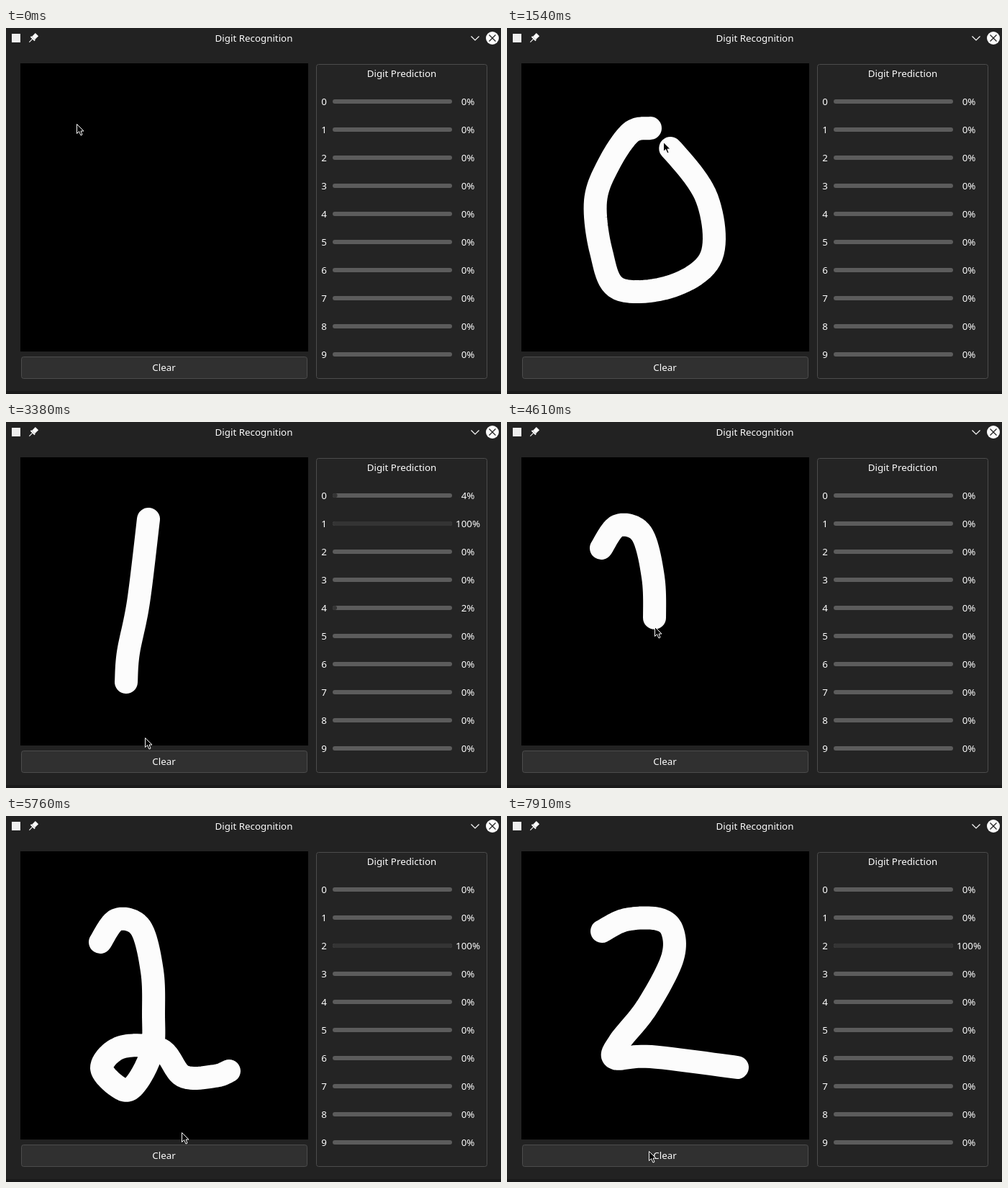
Recreate the animation shown at these times as an HTML page with a canvas. Size 688 by 508 pixels, loop 7990 ms.

```html
<!DOCTYPE html>
<html lang="en">
<head>
<meta charset="utf-8">
<title>Digit Recognition</title>
<style>
  html, body { margin: 0; width: 100%; height: 100%; overflow: hidden; background: #222; }
  canvas { display: block; }
</style>
</head>
<body>
<canvas id="stage" width="688" height="508"></canvas>
<script>
const ctx = document.getElementById('stage').getContext('2d');
const LOOP = 7990, FRAMES = 104, STEP = LOOP / FRAMES;
const PREDICT_DELAY = 165, PRESS_TIME = 110, POINTER_LEAD = 20;
const LIGHT = '#fcfcfc', DARK = '#222', BORDER = '#4c4c4c';

// start and end: pen down and up; arrive: pointer reaches the button; clear: button is released.
const drawings = [
  {
    start: 695, end: 1597, arrive: 1760, clear: 2440, button: [211, 463], percents: { 0: 100 },
    knots: [[199, 139], [172, 145], [142, 188], [123, 240], [131, 311], [155, 362],
      [230, 358], [284, 317], [278, 237], [230, 170], [194, 142]]
  },
  {
    start: 2690, end: 3120, arrive: 3510, clear: 3840, button: [202, 465], percents: { 0: 4, 1: 100, 4: 2 },
    knots: [[198, 135], [184, 250], [170, 320], [167, 361]]
  },
  {
    start: 4290, end: 5235, arrive: 6000, clear: 6200, button: [224, 465], percents: { 2: 100 },
    knots: [[131, 175], [154, 144], [187, 155], [203, 215], [205, 275], [203, 325], [183, 368],
      [163, 380], [133, 350], [160, 321], [215, 324], [246, 361], [290, 361], [310, 354]]
  },
  {
    start: 6620, end: 7390, arrive: 7680, clear: Infinity, button: [197, 465], percents: { 2: 100 },
    knots: [[132, 160], [165, 144], [210, 143], [230, 160], [229, 200], [194, 266],
      [156, 314], [150, 336], [200, 334], [320, 349]]
  }
];
for (const d of drawings) {
  d.points = smooth(d.knots);
  d.lengths = [0];
  d.points.slice(1).forEach((p, i) => {
    const q = d.points[i];
    d.lengths.push(d.lengths[i] + Math.hypot(p[0] - q[0], p[1] - q[1]));
  });
}

function within(t, from, to) { return t >= from && t < to; }
function mix(a, b, u) { return a.map((v, i) => v + (b[i] - v) * u); }

// Eased move from a to b between two times, resting outside them.
function glide(t, from, to, a, b) {
  const u = Math.max(0, Math.min(1, (t - from) / (to - from)));
  return mix(a, b, u * u * (3 - 2 * u));
}

// Catmull-Rom curve through the knots.
function smooth(knots, pieces = 12) {
  const at = i => knots[Math.max(0, Math.min(knots.length - 1, i))];
  const points = [knots[0]];
  for (let i = 0; i < knots.length - 1; i++) {
    const [a, b, c, d] = [at(i - 1), at(i), at(i + 1), at(i + 2)];
    for (let k = 1; k <= pieces; k++) {
      const u = k / pieces;
      points.push([0, 1].map(n => b[n] + u / 2 * (c[n] - a[n]
        + u * (2 * a[n] - 5 * b[n] + 4 * c[n] - d[n]
        + u * (3 * (b[n] - c[n]) + d[n] - a[n])))));
    }
  }
  return points;
}

function drawnPart({ start, end, points, lengths }, t) {
  const goal = Math.min(1, (t - start) / (end - start)) * lengths.at(-1);
  const next = Math.max(1, lengths.findIndex(l => l >= goal));
  const u = (goal - lengths[next - 1]) / (lengths[next] - lengths[next - 1]);
  return [...points.slice(0, next), mix(points[next - 1], points[next], u)];
}

function pointerAt(t) {
  const ahead = t + POINTER_LEAD;
  const next = drawings.findIndex(d => ahead < d.clear);
  const { start, end, arrive, button, knots } = drawings[next];
  if (within(ahead, start, end)) return drawnPart(drawings[next], ahead).at(-1);
  if (ahead >= end) return glide(t, end, arrive, knots.at(-1), button);
  const previous = drawings[next - 1] ?? { clear: 80, button: [98, 133] };
  return glide(t, previous.clear, start, previous.button, knots[0]);
}

function trace(points, close) {
  ctx.beginPath();
  points.forEach(p => ctx.lineTo(...p));
  if (close) ctx.closePath();
}

function line(points, color, width) {
  trace(points);
  ctx.strokeStyle = color;
  ctx.lineWidth = width;
  ctx.stroke();
}

function box(x, y, w, h, radius, fill, border) {
  ctx.beginPath();
  ctx.roundRect(x, y, w, h, radius);
  ctx.fillStyle = fill;
  ctx.fill();
  if (border) {
    ctx.strokeStyle = border;
    ctx.lineWidth = 1;
    ctx.stroke();
  }
}

function text(label, x, y) {
  ctx.fillStyle = LIGHT;
  ctx.fillText(label, x, y);
}

function drawTitleBar() {
  box(8, 8, 12, 12, 0, '#eee');
  ctx.save();
  ctx.translate(38, 14);
  ctx.rotate(Math.PI / 4);
  box(-3, -7, 6, 7, 0, LIGHT);
  box(-4, 0, 8, 2, 0, LIGHT);
  box(-0.6, 2, 1.2, 6, 0, LIGHT);
  ctx.restore();
  text('Digit Recognition', 344.5, 19);
  line([[646.5, 11.5], [652, 17], [657.5, 11.5]], LIGHT, 1.2);
  box(667, 5, 18, 18, 9, LIGHT);
  for (const side of [-4.5, 4.5]) line([[676 - side, 9.5], [676 + side, 18.5]], DARK, 1.3);
}

function drawPanel(t) {
  box(431.5, 50.5, 237, 436, 3, '#242424', BORDER);
  text('Digit Prediction', 550, 68);
  const shown = drawings.find(d => within(t, d.end + PREDICT_DELAY, d.clear));
  for (let digit = 0; digit < 10; digit++) {
    const y = 102 + 39 * digit;
    const percent = shown?.percents[digit] ?? 0;
    text(digit, 442, y + 5);
    box(454, y - 3, 166, 6, 3, '#5c5c5c');
    if (percent) box(454, y - 3, Math.max(6, 1.66 * percent), 6, 3, '#343434');
    text(percent + '%', 642, y + 5);
  }
}

function drawCanvas(t) {
  box(20, 49, 400, 400, 0, '#000');
  const current = drawings.find(d => within(t, d.start, d.clear));
  if (!current) return;
  ctx.save();
  ctx.lineCap = ctx.lineJoin = 'round';
  line(drawnPart(current, t), LIGHT, 32);
  ctx.restore();
}

function drawButton(t) {
  const shift = drawings.some(d => within(t, d.clear - PRESS_TIME, d.clear)) ? 1 : 0;
  box(21.5 + shift, 456.5 + shift, 397, 30, 3, '#303030', BORDER);
  text('Clear', 219.5 + shift, 476 + shift);
}

function drawPointer(t) {
  const [x, y] = pointerAt(t).map(Math.round);
  ctx.save();
  ctx.translate(x + 0.5, y + 0.5);
  trace([[0, 0], [0, 13], [3, 10], [5.5, 15.5], [7.5, 14.5], [5.5, 9.5], [9.5, 9.5]], true);
  ctx.fillStyle = '#000';
  ctx.fill();
  ctx.strokeStyle = LIGHT;
  ctx.lineWidth = 1;
  ctx.stroke();
  ctx.restore();
}

function render(now) {
  const t = Math.floor((now % LOOP + 5) / STEP) % FRAMES * STEP;
  ctx.font = '13.33px "Noto Sans", sans-serif';
  ctx.textAlign = 'center';
  box(0, 0, 688, 508, 0, DARK);
  box(0, 504, 688, 4, 0, '#1a1a1a');
  drawTitleBar();
  drawPanel(t);
  drawCanvas(t);
  drawButton(t);
  drawPointer(t);
}

const began = performance.now();
function tick() {
  render(performance.now() - began);
  requestAnimationFrame(tick);
}
tick();
</script>
</body>
</html>
```
